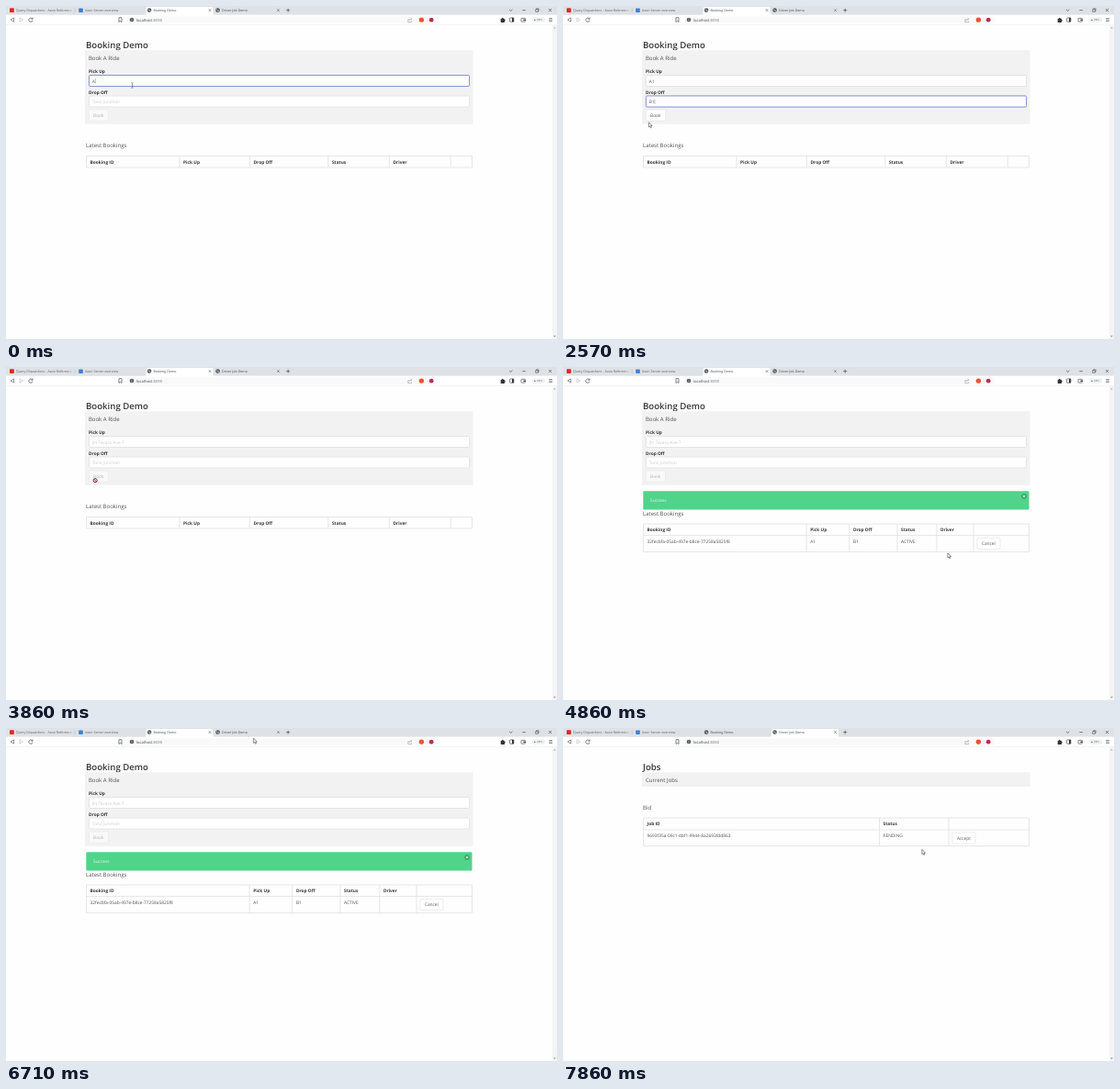
Recreate the animation shown at these times as an HTML page. Size 600 by 363 pixels, loop 8 s.

```html
<!DOCTYPE html>
<html lang="en">
<head>
<meta charset="utf-8">
<title>Booking Demo</title>
<style>
html, body { margin: 0; width: 100%; height: 100%; overflow: hidden; background: #fff; }
svg { display: block; width: 100%; height: 100%; }
text { font-family: "Open Sans", "Noto Sans", sans-serif; text-rendering: geometricPrecision; white-space: pre; }
</style>
</head>
<body>
<svg id="stage" viewBox="0 0 600 363" xmlns="http://www.w3.org/2000/svg">
  <defs>
    <linearGradient id="fade"><stop offset="0" stop-color="#dee1e6" stop-opacity="0"/><stop offset="1" stop-color="#dee1e6"/></linearGradient>
  </defs>
  <g id="scene"></g>
</svg>
<script>
const LOOP = 8000, FPS = 7;
const TAB_KEY = 290, SUBMIT = 3570, SUCCESS = 4000, SWITCH = 6860;
const BODY = 4.82, SUB = 6.05, TAB = 3.63;
const INK = '#363636', TEXT = '#505050', LINE = '#e0e0e0', ICON = '#4a4d51', FOCUS = '#6f83d3';
const PICK_UP = [90.5, 75.5, 414, 12], DROP_OFF = [90.5, 98, 414, 12], BOOK = [90.2, 113.1, 21.4, 12];
const scene = document.getElementById('scene');

// Where the mouse rests or turns: time, x, y
const MOUSE = [
  [0, 137.5, 86.5], [1860, 137.5, 86.5], [2570, 93.4, 126.8], [3000, 97.2, 123.6],
  [4290, 97.2, 123.6], [4860, 418.9, 202.8], [5000, 421, 206], [5710, 341, 89.6],
  [5860, 339, 88], [6000, 339, 88], [6710, 261.8, 2.6], [6860, 261.8, 2.6],
  [7430, 384, 115], [7570, 384, 115], [7860, 390.9, 132.4], [8000, 390.9, 132.4]
];

const ease = k => k * k * (3 - 2 * k);

function mouseAt(t) {
  const i = Math.max(1, MOUSE.findIndex(p => p[0] >= t));
  const [t0, x0, y0] = MOUSE[i - 1], [t1, x1, y1] = MOUSE[i];
  const k = ease((t - t0) / (t1 - t0));
  return { x: x0 + (x1 - x0) * k, y: y0 + (y1 - y0) * k };
}

const inside = (p, b) => p.x >= b[0] && p.x <= b[0] + b[2] && p.y >= b[1] && p.y <= b[1] + b[3];

function text(x, y, s, size = BODY, fill = TEXT, weight = 400) {
  return `<text x="${x}" y="${y}" font-size="${size}" fill="${fill}" font-weight="${weight}">${s}</text>`;
}
function rect(x, y, w, h, fill, r = 0, extra = '') {
  return `<rect x="${x}" y="${y}" width="${w}" height="${h}" rx="${r}" fill="${fill}" ${extra}/>`;
}
function path(d, stroke = ICON, width = .6, fill = 'none') {
  return `<path d="${d}" stroke="${stroke}" stroke-width="${width}" fill="${fill}"/>`;
}
function circle(x, y, r, fill, extra = '') {
  return `<circle cx="${x}" cy="${y}" r="${r}" fill="${fill}" ${extra}/>`;
}
const outline = (color, width = .8) => `stroke="${color}" stroke-width="${width}"`;
const cross = (x, y, r, color = ICON, w = .6) =>
  path(`M${x - r} ${y - r}l${2 * r} ${2 * r}m0 ${-2 * r}l${-2 * r} ${2 * r}`, color, w);

function globe(x, y) {
  return circle(x, y, 2.3, '#55585d') + path(`M${x - 1.6} ${y - .6}q1.2 -.4 1.4 .5t1.6 .6M${x - .2} ${y + 1.6}l.9 -.8`, '#e8eaed', .6);
}

function tab(x, title, active, hover) {
  const shape = `M${x - 1} 10Q${x} 10 ${x} 8.6V2.6Q${x} 1 ${x + 1.6} 1H${x + 71.4}Q${x + 73} 1 ${x + 73} 2.6V8.6Q${x + 73} 10 ${x + 74} 10Z`;
  const fill = active ? '#fff' : hover ? '#eef0f2' : '';
  return (fill ? path(shape, 'none', 0, fill) : '') + globe(x + 3.6, 4.6) + text(x + 8, 6, title, TAB, '#45484c');
}

function browser(jobs, m) {
  const hover = !jobs && inside(m, [227, 1, 73, 9]);
  let s = rect(0, 0, 600, 10, '#dee1e6') + rect(0, 9.6, 600, 10.6, '#fff');
  s += rect(4, 2.2, 4.8, 4.8, '#e0281f', .8) + text(11, 6, 'Query Dispatchers - Axon Reference Guide', TAB, '#5b5f64');
  s += rect(67, 0, 7, 9.4, 'url(#fade)') + rect(73.5, 0, 80, 9.4, '#dee1e6') + path('M75.3 2.6V7', '#a9adb3', .4);
  s += rect(79.2, 2.4, 4.6, 4.6, '#3f7fd6', .8) + text(86, 6, 'Axon Server overview', TAB, '#5b5f64');
  s += tab(152.5, 'Booking Demo', !jobs) + tab(227, 'Driver Job Demo', jobs, hover);
  if (!jobs) s += cross(222, 4.6, 1.2);
  s += cross(296.5, 4.6, 1.2) + path('M305.2 4.6h4M307.2 2.6v4', ICON, .7);
  // Window buttons
  s += path('M548 3.8l1.7 1.6l1.7 -1.6M562.4 4.6h3.4', '#333', .6);
  s += path('M576.7 3.7h2.6v2.6h-2.6zM577.5 3.6v-.8h2.6v2.6h-.7', '#333', .5) + cross(592.5, 4.5, 1.5, '#333');
  // Toolbar
  s += path('M8.6 12.9V17.1L5 15z', ICON, .6) + path('M15 12.9V17.1L18.6 15z', '#b5b8bc', .6);
  s += path('M28.6 13.8A2.1 2.1 0 1 0 29 15.6M29.1 12.6v1.6h-1.6', ICON, .7);
  s += path('M123 12.7h3v4.8l-1.5 -1.2l-1.5 1.2z', ICON, .7);
  s += rect(131.5, 11.2, 339, 7.6, '#f9f9fa', 2);
  s += circle(137, 15, 2.3, '#55585d') + path('M137 14.7v1.5M137 13.5v.6', '#fff', .6);
  s += `<text x="142" y="16.5" font-size="4.18" fill="#3c4043">localhost<tspan fill="#777b80">:${jobs ? 8080 : 8090}</tspan></text>`;
  s += path('M439.2 14.6h-1.4v3h3.8v-1.4M439 16.2q.2 -2 2.6 -2M440.6 13l1.3 1.2l-1.3 1.2', '#8b8e92', .5);
  s += circle(452.4, 15.1, 2.7, '#f0502c') + path('M458 12.6v5', '#d5d7da', .4) + circle(463.2, 15.2, 2.4, '#b8324f');
  s += path('M538.7 13.8h1.3q0 -1.1 .8 -1.1t.8 1.1h1.3v1.2q1 0 1 .8t-1 .8v1.3h-4.2z', 'none', 0, '#333');
  s += rect(548.6, 12.9, 4.3, 4.3, 'none', .4, outline('#333', .6)) + rect(551, 12.9, 1.9, 4.3, '#333');
  s += rect(561, 13.3, 4.4, 3.8, 'none', .6, outline('#333', .6)) + rect(563.4, 14.6, 2.2, 1.3, '#333');
  s += rect(573, 12.3, 14.2, 5.5, '#f0f1f3', 2.7) + path('M575 15.9l.9 -1.7l.9 1.7z', 'none', 0, '#666') + text(578, 16.1, 'VPN', 2.9, '#666');
  s += path('M591.2 13.5h3.7M591.2 15h3.7M591.2 16.5h3.7', ICON, .6) + path('M0 20.3H600', '#e3e5e8', .5);
  // Scroll bar
  s += rect(594.8, 20.6, 5.2, 342.4, '#f4f4f4');
  s += path('M596 24.4l1.4 -1.6l1.4 1.6z', 'none', 0, '#b8b8b8') + path('M596 359.4l1.4 1.6l1.4 -1.6z', 'none', 0, '#8a8a8a');
  return s;
}

function button(x, y, w, label, faded, m) {
  const hover = !faded && inside(m, [x, y, w, 12]);
  return rect(x, y, w, 12, '#fff', 1.2, outline(hover ? '#bdbdbd' : LINE, .6) + (faded ? ' opacity=".55"' : '')) +
    text(x + 4.9, y + 7.7, label, BODY, faded ? '#b2b2b2' : '#5a5a5a');
}

function input(box, value, hint, focused, m) {
  const y = box[1];
  const edge = focused ? FOCUS : inside(m, box) ? '#bcbcbc' : LINE;
  let s = focused ? rect(...box, 'none', 1.2, outline(FOCUS, 2) + ' opacity=".15"') : '';
  s += rect(...box, '#fff', 1.2, outline(edge));
  s += text(93.7, y + 8, value || hint, BODY, value ? '#555' : '#cbcbcb');
  if (focused) {
    const x = 93.9 + (value.length ? .8 + 2.6 * value.length : 0);
    s += path(`M${x} ${y + 3.4}v5.6`, '#555', .4);
  }
  return s;
}

// Column edges, then rows as [height, cells, weight]
function table(y, cols, rows) {
  const left = cols[0], right = cols[cols.length - 1];
  let s = '', d = `M${left} ${y}H${right}`, top = y;
  for (const [h, cells, weight] of rows) {
    cells.forEach((c, i) => s += text(cols[i] + 4.1, top + 8, c, BODY, weight > 400 ? INK : TEXT, weight));
    top += h;
    d += `M${left} ${top}H${right}`;
  }
  cols.forEach(x => d += `M${x} ${y}V${top}`);
  return path(d, LINE, .8) + s;
}

function heading(title, panel, height) {
  return text(87, 45.6, title, 9.65, INK, 600) + rect(86, 48.3, 422.6, height, '#f2f2f2') + text(89.9, 58.8, panel, SUB, TEXT);
}

function bookingPage(t, m) {
  const sent = t >= SUBMIT, done = t >= SUCCESS;
  const from = sent ? '' : t < 140 ? 'A' : 'A1';
  const to = sent || t < 710 ? '' : t < 1140 ? 'B' : 'B1';
  let s = heading('Booking Demo', 'Book A Ride', 80.4);
  s += text(90, 73.3, 'Pick Up', BODY, INK, 700) + input(PICK_UP, from, 'Jln Tevaro Ave 7', t < TAB_KEY, m);
  s += text(90, 95.8, 'Drop Off', BODY, INK, 700) + input(DROP_OFF, to, 'Torvi Junction', t >= TAB_KEY && !sent, m);
  s += button(BOOK[0], BOOK[1], BOOK[2], 'Book', !to, m);
  const head = ['Booking ID', 'Pick Up', 'Drop Off', 'Status', 'Driver'];
  if (!done) {
    return s + text(87, 154.3, 'Latest Bookings', SUB) +
      table(163.5, [87.5, 189, 265.4, 350.8, 417.4, 484.2, 507.5], [[12.5, head, 700]]);
  }
  s += rect(87.3, 135.2, 420.2, 20.2, '#50d48a', 1.2) + text(95, 147, 'Success', BODY, '#e6faef');
  s += circle(502, 140.9, 3, '#40a96e') + cross(502, 140.9, 1.1, '#fff', .7);
  s += text(87, 161.9, 'Latest Bookings', SUB);
  s += table(171, [87.5, 265.2, 311.8, 364, 406.8, 447, 507.5], [
    [12.6, head, 700],
    [18, ['32fecbfa-05ab-497e-b8ce-77258a5825f8', 'A1', 'B1', 'ACTIVE'], 400]
  ]);
  return s + button(451, 186.6, 25, 'Cancel', false, m);
}

function jobsPage(m) {
  return heading('Jobs', 'Current Jobs', 15.6) + text(87, 89.2, 'Bid', SUB) +
    table(98, [87.5, 344.5, 420, 507.5], [
      [13, ['Job ID', 'Status'], 700],
      [17.6, ['9693f35a-09c1-4bf1-9944-8a2693fdd863', 'PENDING'], 400]
    ]) + button(424, 114, 25, 'Accept', false, m);
}

function pointer(t, m) {
  const booking = t < SWITCH;
  const onInput = booking && (inside(m, PICK_UP) || inside(m, DROP_OFF));
  const onBook = booking && inside(m, BOOK);
  let s;
  if (onInput) s = path('M-1.2 -2.8h.8L0 -2.4L.4 -2.8h.8M0 -2.4V2.4M-1.2 2.8h.8L0 2.4L.4 2.8h.8', '#444', .5);
  else if (onBook && t >= SUBMIT) s = circle(0, 0, 2, '#fff', outline('#8f1f24', 1)) + path('M-1.4 -1.4L1.4 1.4', '#8f1f24', 1);
  else if (onBook) s = path('M-.5 0q.5 -.6 1 0v2.2l2 .5q.8 .2 .7 1l-.4 2.1h-3l-1.8 -2.4q.3 -.8 1.1 -.2l.4 .4z', '#222', .45, '#fff');
  else s = path('M0 0V5.1L1.2 4.1L2 6L2.9 5.6L2.1 3.8H3.7Z', '#222', .5, '#fff');
  return `<g transform="translate(${m.x} ${m.y})">${s}</g>`;
}

function draw(t) {
  const m = mouseAt(t), jobs = t >= SWITCH;
  scene.innerHTML = rect(0, 0, 600, 363, '#fefefe') + (jobs ? jobsPage(m) : bookingPage(t, m)) + browser(jobs, m) + pointer(t, m);
}

let last = -1;
function tick() {
  const step = Math.floor((performance.now() % LOOP + 3) * FPS / 1000) % (LOOP * FPS / 1000);
  if (step !== last) draw(Math.round(step * 100 / FPS) * 10);
  last = step;
  requestAnimationFrame(tick);
}
tick();
</script>
</body>
</html>
```
